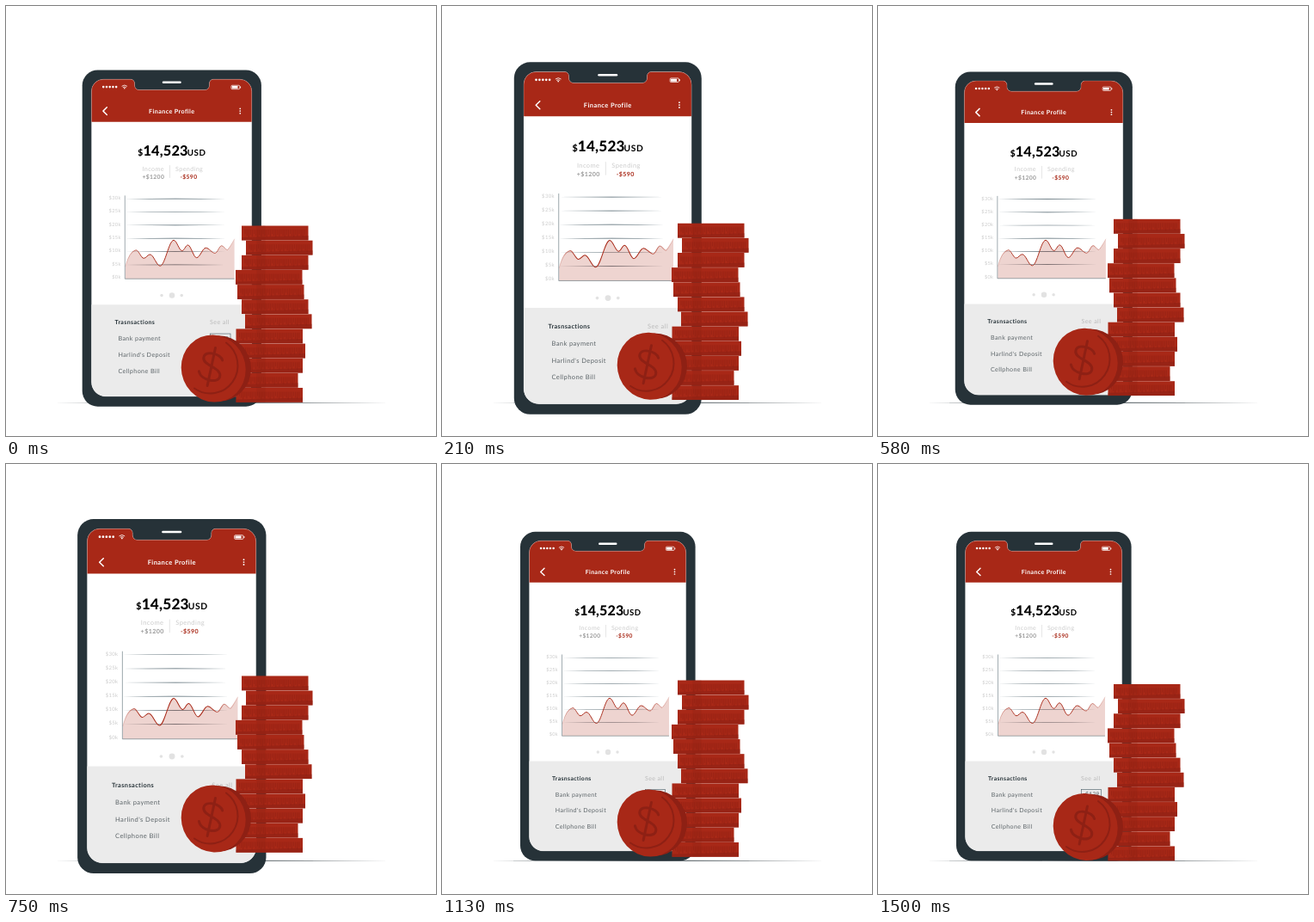
An HTML page that plays this animation: 500 px wide and 500 px high, repeating every 1540 ms.

```html
<!DOCTYPE html>
<html lang="en">
<head>
<meta charset="utf-8">
<title>Finance profile</title>
<style>
  html, body { margin: 0; width: 100%; height: 100%; overflow: hidden; background: #fff; }
  svg { display: block; width: 100vw; height: 100vh; }
  text { font-family: Lato, sans-serif; font-size: 7px; letter-spacing: .055em; text-rendering: geometricPrecision; }
  .b { font-weight: 700; }
  .mid { text-anchor: middle; }
  .line { fill: none; stroke-linecap: round; stroke-linejoin: round; }
  .sum { font-weight: 800; letter-spacing: .01em; }
  .small { font-size: 6.6px; }
</style>
</head>
<body>
<svg viewBox="0 0 500 500">
  <defs>
    <path id="screen" d="M115 89.3H146a4.5 4.5 0 0 1 4.5 4.5v2.5a5 5 0 0 0 5 5H230.5a5 5 0 0 0 5-5v-2.5a4.5 4.5 0 0 1 4.5-4.5H270a13.7 13.7 0 0 1 13.7 13.7V433.5a16.5 16.5 0 0 1-16.5 16.5H118a16.5 16.5 0 0 1-16.5-16.5V102.8a13.5 13.5 0 0 1 13.5-13.5z"/>
    <clipPath id="clip"><use href="#screen"/></clipPath>
    <linearGradient id="fade" gradientUnits="userSpaceOnUse" x1="140" x2="264">
      <stop stop-color="#a82817" stop-opacity=".15"/>
      <stop offset=".15" stop-color="#a82817"/>
      <stop offset=".75" stop-color="#a82817"/>
      <stop offset="1" stop-color="#a82817" stop-opacity=".15"/>
    </linearGradient>
  </defs>

  <path d="M56 461.2Q250 460.3 445 461.2Q250 462.1 56 461.2z" fill="#263238"/>

  <g id="phone">
    <rect x="91" y="78.8" width="203.6" height="382.5" rx="17.5" fill="#263238"/>
    <use href="#screen" fill="#fff"/>
    <g clip-path="url(#clip)">
      <path d="M100 88H285V137.7H100z" fill="#a82817"/>
      <path d="M100 345.6H285V451H100z" fill="#ebebeb"/>
    </g>
    <use href="#screen" fill="none" stroke="#fff" stroke-opacity=".5" stroke-width=".4"/>

    <g fill="#fff">
      <rect x="182" y="91.5" width="21.5" height="2.4" rx="1.2"/>
      <g id="signal"></g>
      <circle cx="139" cy="99.6" r=".8"/>
      <path class="line" d="M136.2 97q2.8-2.3 5.6 0M137.4 98.4q1.6-1.3 3.2 0" stroke="#fff" stroke-width=".8"/>
      <rect x="260.4" y="96.2" width="9.6" height="4.3" rx="1" fill="none" stroke="#fff" stroke-width=".7"/>
      <path d="M261.2 97h6.6v2.7h-6.6zM270.4 97.4h.9v1.9h-.9z"/>
      <path class="line" d="M119 121.2l-4.3 4.2 4.3 4.2" stroke="#fff" stroke-width="1.4"/>
      <circle cx="270.5" cy="122.6" r=".85"/><circle cx="270.5" cy="125.3" r=".85"/><circle cx="270.5" cy="128" r=".85"/>
      <text class="b mid" x="192.8" y="128">Finance Profile</text>
    </g>

    <g class="b">
      <text class="sum" x="154.2" y="176" style="font-size:10px">$</text>
      <text class="sum" x="160.2" y="176" style="font-size:16px">14,523</text>
      <text x="210.4" y="176" style="font-size:9.6px">USD</text>
    </g>
    <g class="mid">
      <text x="171.7" y="193.4" fill="#ccc">Income</text>
      <text x="212.7" y="193.4" fill="#ccc">Spending</text>
      <text class="b small" x="171.8" y="202.4" fill="#999">+$1200</text>
      <text class="b small" x="212" y="202.4" fill="#a82817">-$590</text>
    </g>
    <path d="M190.5 187V201.5" stroke="#ddd" stroke-width=".7"/>

    <g id="grid"></g>
    <path id="area" fill="#a82817" opacity=".2"/>
    <path id="curve" class="line" stroke="url(#fade)" stroke-width=".95"/>
    <path d="M139.5 221.5V316.2H264" fill="none" stroke="#455a64" stroke-width=".5"/>

    <g fill="#e2e2e2"><circle cx="181.3" cy="335" r="1.7"/><circle cx="193" cy="335" r="3.2"/><circle cx="204" cy="335" r="1.7"/></g>

    <text class="b" x="128" y="368.2" fill="#263238" style="font-size:6.8px">Trasnsactions</text>
    <text x="236" y="368.2" fill="#bbb">See all</text>
    <g fill="#5c6468">
      <text x="131.8" y="386.8">Bank payment</text>
      <text x="131.8" y="405.3">Harlind's Deposit</text>
      <text x="131.8" y="423.5">Cellphone Bill</text>
      <rect x="236.3" y="378.6" width="23.2" height="10.4" fill="none" stroke="#455a64" stroke-width=".6"/>
      <text class="mid small" x="248" y="386.4">-$129</text>
    </g>
  </g>

  <g id="coins">
    <g id="stack"></g>
    <ellipse cx="247" cy="422" rx="38" ry="38.3" fill="#8e2014"/>
    <ellipse cx="241.2" cy="422" rx="37.2" ry="39.3" transform="rotate(-22 241.2 422)" fill="#a82817"/>
    <g class="line" stroke="#8e2014">
      <path d="M256 392A31.5 32 0 1 1 219 445" stroke-width="2"/>
      <g transform="translate(238.8 420) rotate(12)" stroke-width="3">
        <path d="M11-10C8-17-11-18-11-9C-11 1 12-2 12 9C12 18-9 18-13 8M0-22.5V22.5"/>
      </g>
    </g>
  </g>
</svg>
<script>
const LOOP = 1540, PHASE = 33;
const $ = id => document.getElementById(id);

$('signal').innerHTML = [0, 1, 2, 3, 4]
  .map(i => `<circle cx="${115 + i * 3.65}" cy="98" r="1.25"/>`).join('');

// Value labels and tapered rules
$('grid').innerHTML = [30, 25, 20, 15, 10, 5, 0].map((value, i) => {
  const y = 225.2 + i * 15;
  const rule = value ? `<path d="M139.5 ${y}Q197 ${y - .65} 254 ${y}Q197 ${y + .65} 139.5 ${y}z" fill="#455a64"/>` : '';
  return `${rule}<text x="135" y="${y + .9}" text-anchor="end" fill="#ccc" style="font-size:5.6px">$${value}k</text>`;
}).join('');

// Chart turning points, joined with short level tangents
const turns = [[152, 283.5], [161, 292.8], [168, 288.5], [179.5, 301.5], [195, 272.3], [204.5, 284.3],
  [211, 277.8], [221, 292.2], [231.5, 281], [242, 287], [249.5, 278.5], [256, 283.3]];
const curve = turns.slice(1).reduce((d, [x, y], i) => {
  const [px, py] = turns[i], handle = (x - px) * .36;
  return `${d}C${px + handle} ${py} ${x - handle} ${y} ${x} ${y}`;
}, `M140 302Q144.5 285 ${turns[0]}`) + 'Q258 282 264 271';
$('curve').setAttribute('d', curve);
$('area').setAttribute('d', curve + 'V316.2H140z');

// Coin pile: left edges from top to bottom
$('stack').innerHTML = [274, 279, 274, 267, 269, 274, 278, 267.5, 270.5, 267.5, 262, 267.5].map((x, row) => {
  const y = 256 + row * 17.13;
  let ridges = '';
  for (let i = 0; i < 34; i++) {
    ridges += `M${x + 4 + i * 2.1} ${y + 4.5}v${5 + (i * 7 + row * 5) % 5}`;
  }
  return `<rect x="${x}" y="${y}" width="77.5" height="16.85" fill="#a82817"/>
    <path d="${ridges}" stroke="#8e2014" stroke-width=".8" opacity=".75"/>
    <path d="M${x} ${y + 13.5}L${x + 77.5} ${y + 11.5}v5.35H${x}z" fill="#8e2014" opacity=".6"/>
    <rect x="291.5" y="${y}" width="10" height="16.85" fill="#8e2014" opacity=".28"/>`;
}).join('');

const beats = [[0, 1.022], [122, 1.1], [425, 1], [562, 1], [717, 1.1], [867, 1], [LOOP, 1]];

function track(points, t) {
  const i = points.findIndex(p => p[0] > t);
  const [t0, v0] = points[i - 1], [t1, v1] = points[i];
  return v0 + (v1 - v0) * (t - t0) / (t1 - t0);
}

function draw(now) {
  const t = now % LOOP;
  const lift = 10 * (1 - Math.abs(Math.min(t + PHASE, 1500) / 750 - 1));
  $('phone').setAttribute('transform', `translate(193 270) scale(${track(beats, t)}) translate(-193 -270)`);
  $('coins').setAttribute('transform', `translate(0 ${-lift})`);
}

const start = performance.now();
function tick() {
  draw(performance.now() - start);
  requestAnimationFrame(tick);
}
tick();
</script>
</body>
</html>
```
